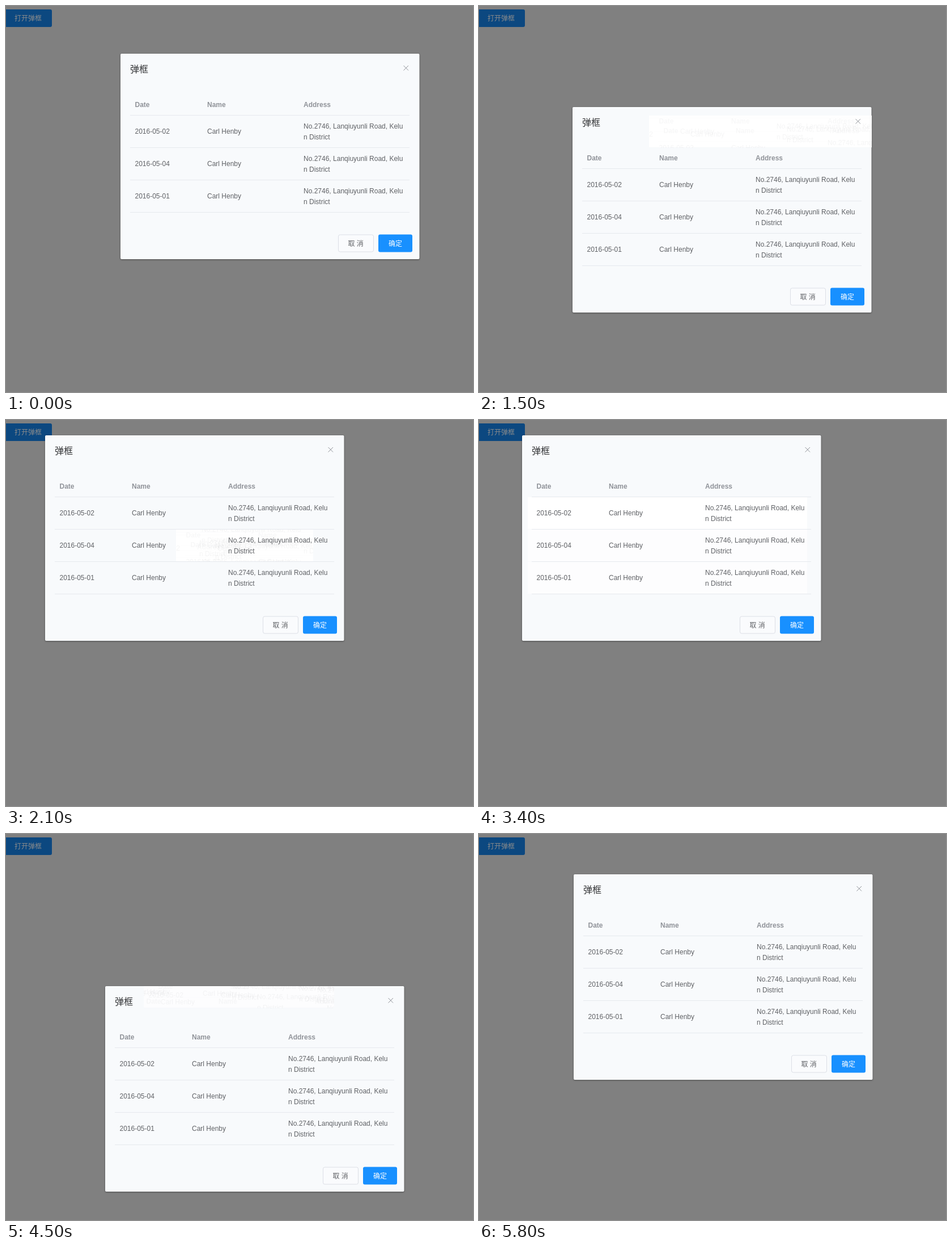
Write an HTML page that moves like this. It is 824 px wide and 680 px high and loops after 7300 ms.

```html
<!DOCTYPE html>
<html lang="zh">
<head>
<meta charset="utf-8">
<title>弹框</title>
<style>
html, body { margin: 0; width: 100%; height: 100%; overflow: hidden; background: #808080; }
svg { display: block; width: 824px; height: 680px; }
text { font: 12px "Liberation Sans", Arial, "Noto Sans CJK SC", "Noto Sans CJK", sans-serif; fill: #606266; white-space: pre; }
.head { font-weight: bold; fill: #909399; }
.title { font-size: 16px; fill: #303133; }
.light { fill: #fff; }
.dim { fill: #8c8c8c; }
#panel rect { filter: drop-shadow(0 1px 1.5px rgba(0, 0, 0, .4)); }
</style>
</head>
<body>
<svg viewBox="0 0 824 680">
  <clipPath id="clip"><rect id="clipBox"/></clipPath>
  <rect width="824" height="680" fill="#808080"/>
  <rect x="-10" y="6" width="91" height="31" rx="3" fill="#0c4880"/>
  <text class="dim" x="15" y="25.5">打开弹框</text>
  <g id="panel"><rect width="527.5" height="362" rx="2" fill="#f8fafc"/></g>
  <g id="trail" clip-path="url(#clip)"></g>
  <g id="content">
    <text class="title" x="17" y="32.5">弹框</text>
    <path d="M499.5 21l8.5 8.5m0-8.5l-8.5 8.5" stroke="#909399" fill="none"/>
    <g id="table"></g>
    <rect x="384.5" y="319" width="62" height="30" rx="3" fill="#fafbfd" stroke="#dcdfe6"/>
    <text x="401.5" y="338.5">取 消</text>
    <rect x="455" y="318.5" width="60" height="31" rx="3" fill="#1890ff"/>
    <text class="light" x="473" y="338.5">确定</text>
  </g>
</svg>
<script>
const LOOP = 7300, W = 528, H = 362, ROW_W = 493, ROW_H = 57;
const $ = id => document.getElementById(id);

// Dialog positions: [time, x, y], each held until the next
const poses = [
  [0, 202, 84], [1200, 220, 89], [1300, 292, 113], [1400, 300, 130], [1500, 165, 178],
  [1600, 14, 134], [1700, 18, 89], [1800, 22, 65], [1900, 46, 37], [2000, 60, 29], [2100, 69, 27],
  [3400, 76, 27], [3500, 120, 45], [3600, 194, 87], [3700, 226, 147], [3800, 243, 179],
  [4400, 222, 205], [4500, 175, 268], [4600, 134, 330],
  [4800, 139, 262], [4900, 145, 186], [5000, 148, 151],
  [5600, 151, 138], [5700, 161, 96], [5800, 167, 71]
];

// Highlighted rows left behind at the start of a drag
const drags = [
  { start: 1200, end: 3400, first: 0, x: 219, y: 193, rows: 1 },
  { start: 3400, end: 4800, first: 11, x: 86, y: 136, rows: 3 }
];

function add(parent, tag, attrs, text) {
  const el = document.createElementNS("http://www.w3.org/2000/svg", tag);
  for (const key in attrs) el.setAttribute(key, attrs[key]);
  if (text) el.textContent = text;
  parent.append(el);
  return el;
}

function place(el, x, y) {
  el.setAttribute("transform", `translate(${x} ${y})`);
}

function show(el, on) {
  el.setAttribute("display", on ? "inline" : "none");
}

const table = $("table"), trail = $("trail");
const line = y => add(table, "path", { d: `M17 ${y}h${ROW_W}`, stroke: "#e6e9ee" });
const cell = (x, y, text) => add(table, "text", { x, y }, text);

["Date", "Name", "Address"].forEach((label, i) =>
  add(table, "text", { x: [25.5, 153, 323][i], y: 94, class: "head" }, label));
line(108.5);
["2016-05-02", "2016-05-04", "2016-05-01"].forEach((date, i) => {
  const y = i * ROW_H;
  cell(25.5, y + 141, date);
  cell(153, y + 141, "Carl Henby");
  cell(323, y + 131.5, "No.2746, Lanqiuyunli Road, Kelu");
  cell(323, y + 151, "n District");
  line(y + 165.5);
});

for (const drag of drags) {
  drag.group = add(trail, "g", {});
  for (let i = 0; i < drag.rows; i++) {
    add(drag.group, "rect", {
      x: drag.x, y: drag.y + i * ROW_H, width: ROW_W, height: ROW_H - 1,
      fill: i ? "#fdfdfe" : "#fff"
    });
  }
}
const ghosts = poses.map(([, x, y]) => {
  const ghost = add(trail, "use", { href: "#table", opacity: 0.06 });
  place(ghost, x, y);
  return ghost;
});

// The trail survives only where every dialog position of the drag overlaps it
function drawTrail(t, now) {
  const drag = drags.find(d => t >= d.start && t < d.end);
  drags.forEach(d => show(d.group, d === drag));
  ghosts.forEach((g, i) => show(g, drag && i >= drag.first && i < now));
  if (!drag) return;
  let left = drag.x, top = drag.y;
  let right = left + ROW_W, bottom = top + drag.rows * ROW_H;
  for (const [, x, y] of poses.slice(drag.first, now + 1)) {
    left = Math.max(left, x);
    top = Math.max(top, y);
    right = Math.min(right, x + W);
    bottom = Math.min(bottom, y + H);
  }
  const box = $("clipBox");
  box.setAttribute("x", left);
  box.setAttribute("y", top);
  box.setAttribute("width", Math.max(0, right - left));
  box.setAttribute("height", Math.max(0, bottom - top));
}

function draw(t) {
  const now = poses.filter(p => p[0] <= t).length - 1;
  const [, x, y] = poses[now];
  place($("panel"), x, y);
  place($("content"), x, y);
  drawTrail(t, now);
}

const begin = performance.now();
function tick() {
  draw((performance.now() - begin) % LOOP);
  requestAnimationFrame(tick);
}
tick();
</script>
</body>
</html>
```
